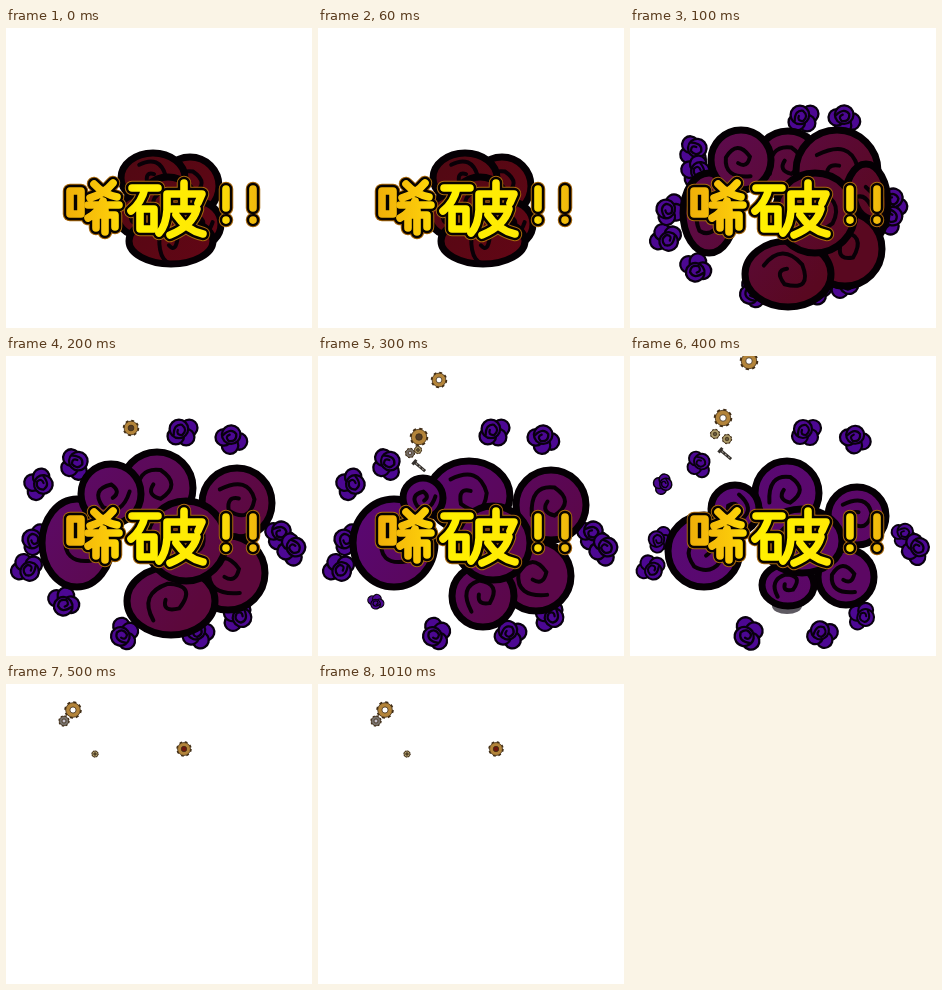
An HTML page that plays this animation: 306 by 300 pixels, repeating every 1350 ms.

```html
<!DOCTYPE html>
<html lang="zh">
<head>
<meta charset="utf-8">
<title>唏破!!</title>
<style>
html, body { margin: 0; width: 100%; height: 100%; overflow: hidden; background: #fff; }
svg { display: block; width: 100%; height: 100%; }
.pose, .lettering { visibility: hidden; animation: flash 1350ms step-end infinite; }
.pose.last { animation-name: rest; }
.lettering { animation-name: shout; fill: none; stroke-linecap: round; stroke-linejoin: round; }
@keyframes flash { 0% { visibility: visible } 7.4074%, 100% { visibility: hidden } }
@keyframes rest { 0% { visibility: visible } 62.963%, 100% { visibility: hidden } }
@keyframes shout { 0% { visibility: visible } 37.037%, 100% { visibility: hidden } }
.lobe { stroke: #050004; stroke-width: 7; }
.curl { fill: none; stroke: #090007; stroke-width: 4; stroke-linecap: round; }
</style>
</head>
<body>
<svg viewBox="0 0 306 300" role="img" aria-label="唏破!!">
  <defs>
    <linearGradient id="gold" gradientUnits="userSpaceOnUse" x1="58" x2="252">
      <stop offset="0" stop-color="#eeae08"/>
      <stop offset=".22" stop-color="#fbc90a"/>
      <stop offset=".38" stop-color="#fff000"/>
      <stop offset=".75" stop-color="#ffe905"/>
      <stop offset="1" stop-color="#efb60c"/>
    </linearGradient>
    <g id="puff" stroke="#08000d" stroke-width="2.2" stroke-linecap="round">
      <g fill="#4c0793">
        <circle cx="7" cy="-4" r="8"/>
        <circle cx="4" cy="5" r="8"/>
        <circle cx="-6" cy="4" r="8"/>
        <circle cx="-3" cy="-3" r="9"/>
      </g>
      <path fill="none" d="M-8 3Q-8-8 0-7Q6-2 0 3Q-6 3-4-2"/>
    </g>
    <g id="words">
      <path d="M64 163H75V186H64Z"/>
      <path d="M107 155Q98 166 84 170M88 156Q97 166 111 169M82 177H113M97 173Q92 185 82 190M90 200V187H109V199M99 182V204"/>
      <path d="M126 160H152M139 160Q136 174 125 183M134 181H148V201H134Z"/>
      <path d="M161 166H196L192 175M161 166V182Q160 198 153 205M178 155V180M166 181H191Q186 198 164 207M170 187Q180 202 197 206"/>
      <path d="M220 161V180m0 12v.1M247 161V180m0 12v.1"/>
    </g>
  </defs>
  <g id="scene"></g>
  <g class="lettering">
    <use href="#words" stroke="#a8680b" stroke-width="14.5"/>
    <use href="#words" stroke="#080300" stroke-width="12.5"/>
    <use href="#words" stroke="url(#gold)" stroke-width="7.6"/>
  </g>
</svg>
<script>
// A lobe is [x, y, rx, ry]; without ry it is round.
const clouds = [
  { from: '#4b0912', to: '#620615', lobes: [
    [184, 158, 29], [147, 150, 32, 25], [131, 187, 20],
    [193, 196, 22], [165, 213, 42, 23], [162, 177, 28]] },
  { from: '#5d0b50', to: '#590820', lobes: [
    [158, 136, 33], [207, 143, 41], [236, 176, 22, 40], [79, 185, 26, 40],
    [111, 132, 30], [215, 221, 37], [158, 246, 43, 33], [185, 185, 40]] },
  { from: '#5c0a67', to: '#5c083b', lobes: [
    [151, 132, 36], [231, 147, 35], [71, 187, 35, 44], [105, 138, 30],
    [222, 217, 37], [165, 245, 44, 34], [180, 185, 40]] },
  { from: '#590774', to: '#5b0749', lobes: [
    [233, 149, 35], [151, 140, 41, 35], [76, 187, 41, 44], [105, 142, 20],
    [218, 220, 35], [165, 240, 31], [175, 187, 37]] },
  { from: '#570977', to: '#5c0763', lobes: [
    [157, 137, 32], [227, 160, 29], [105, 153, 24], [74, 195, 36],
    [216, 221, 28], [158, 229, 26, 21], [172, 185, 40, 32]] }
];

// A puff bursts out from one point, settles at another, then shrinks to a last radius.
const puffs = [
  [173, 90, 176, 76, 15], [214, 91, 225, 83, 15],
  [64, 123, 69, 108, 13], [66, 143, 33, 128, 10],
  [36, 210, 21, 212, 14], [66, 240, 58, 246, 0],
  [123, 264, 118, 278, 16], [40, 182, 30, 184, 13],
  [185, 262, 192, 278, 15], [262, 174, 274, 179, 13],
  [259, 190, 286, 193, 15], [215, 255, 232, 260, 14]
];

const metals = {
  brass: ['#b3843a', '#fff'],
  dark: ['#b3843a', '#533c25'],
  ruby: ['#b3843a', '#70150c'],
  steel: ['#77716b', '#c5c1cc'],
  pale: ['#b2a16e', '#64583e']
};
const gears = {
  2: [[125, 72, 8, 'dark']],
  3: [[121, 24, 8, 'brass'], [101, 81, 9, 'dark'], [92, 97, 5, 'steel'], [100, 94, 4, 'pale']],
  4: [[119, 5, 9, 'brass'], [93, 62, 9, 'brass'], [85, 78, 5, 'pale'], [97, 83, 5, 'pale']],
  5: [[67, 26, 8.5, 'brass'], [58, 37, 5.5, 'steel'], [89, 70, 3.5, 'pale'], [178, 65, 7.5, 'ruby']]
};
const bolts = { 3: [101, 110], 4: [95, 98] };

function drawPuff([x1, y1, x2, y2, end], i, pose) {
  const [x, y] = pose === 1 ? [x1, y1] : [x2, y2];
  const r = pose === 4 ? end : pose === 3 && !end ? 8 : 15.5;
  return r ? `<use href="#puff" transform="translate(${x} ${y}) rotate(${i * 47}) scale(${r / 15})"/>` : '';
}

function drawLobe([x, y, rx, ry = rx], i, fill) {
  const at = (u, v) => `${u * rx} ${v * ry} `;
  const curl = `M${at(-.55, .3)}Q${at(-.6, -.6)}${at(.1, -.5)}Q${at(.7, -.1)}${at(.1, .3)}Q${at(-.3, .2)}${at(-.1, -.1)}`;
  return `<ellipse class="lobe" cx="${x}" cy="${y}" rx="${rx}" ry="${ry}" fill="${fill}"/>
    <path class="curl" transform="translate(${x} ${y}) rotate(${i * 67})" d="${curl}"/>`;
}

function drawCloud({ from, to, lobes }, pose) {
  const id = `tone${pose}`;
  return `<linearGradient id="${id}" gradientUnits="userSpaceOnUse" x1="70" y1="110" x2="210" y2="230">
    <stop stop-color="${from}"/><stop offset="1" stop-color="${to}"/></linearGradient>` +
    lobes.map((lobe, i) => drawLobe(lobe, i, `url(#${id})`)).join('');
}

function drawGear([x, y, size, kind]) {
  const [metal, hole] = metals[kind];
  const r = size * .86;
  return `<g transform="translate(${x} ${y})" stroke="#3f2c16" stroke-width=".8">
    <circle r="${r}" fill="none" stroke-width="${r * .4}" stroke-dasharray="${Math.PI * r / 8}"/>
    <circle r="${r}" fill="${metal}"/><circle r="${r * .42}" fill="${hole}"/></g>`;
}

const drawBolt = ([x, y]) =>
  `<g transform="translate(${x} ${y}) rotate(40)" fill="none">
    <path d="M-6-3V3M-6 0H8" stroke="#34302c" stroke-width="3"/>
    <path d="M-4 0H7" stroke="#aaa29a" stroke-dasharray="2"/></g>`;

function drawPose(pose) {
  const ring = pose % 5 ? puffs.map((p, i) => drawPuff(p, i, pose)) : [];
  const smoke = pose === 4 ? '<ellipse cx="157" cy="250" rx="15" ry="8" fill="#5d5961"/>' : '';
  const cloud = clouds[pose] ? drawCloud(clouds[pose], pose) : '';
  const metal = (gears[pose] || []).map(drawGear);
  const bolt = bolts[pose] ? drawBolt(bolts[pose]) : '';
  return `<g class="pose${pose === 5 ? ' last' : ''}" style="animation-delay:${pose * 100}ms">
    ${ring.join('')}${smoke}${cloud}${metal.join('')}${bolt}</g>`;
}

document.getElementById('scene').innerHTML = [0, 1, 2, 3, 4, 5].map(drawPose).join('');
</script>
</body>
</html>
```
